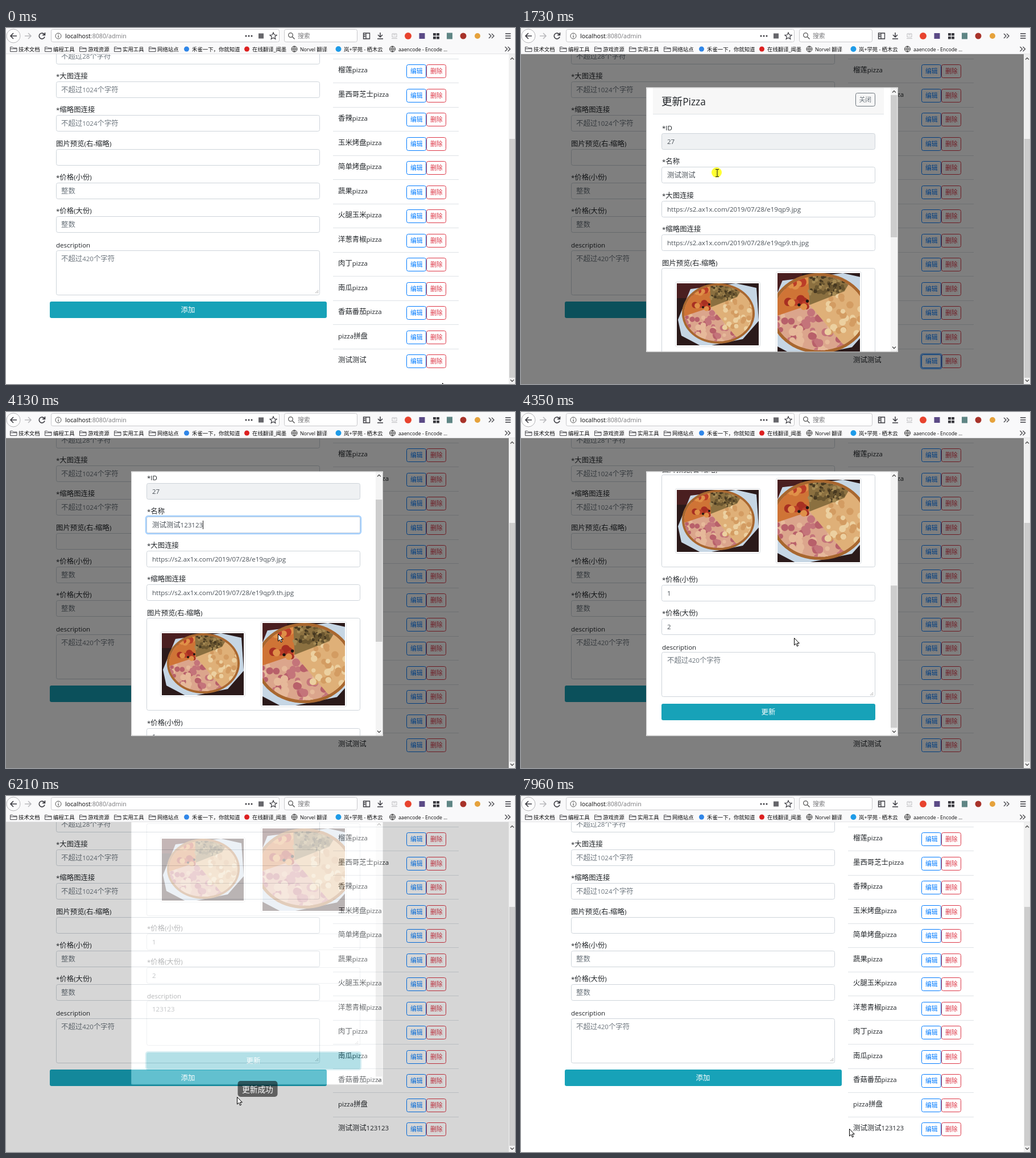
Animation, 895 px wide and 626 px high, one loop 8 s. Source, as an HTML page:

```html
<!DOCTYPE html>
<html lang="zh-CN">
<head>
<meta charset="utf-8">
<title>Pizza admin</title>
<style>
html, body { margin: 0; width: 100%; height: 100%; overflow: hidden; background: #fff; }
svg { display: block; }
text { font-family: "Open Sans", "Noto Sans CJK SC", "Noto Sans CJK", sans-serif; }
</style>
</head>
<body>
<svg id="stage" width="895" height="626" viewBox="0 0 895 626"></svg>
<script>
const INK = '#212529', GREY = '#6c757d', FIELD = '#495057', TEAL = '#17a2b8', BLUE = '#007bff', RED = '#dc3545';
const $ = id => document.getElementById(id);
const range = n => [...Array(n).keys()];

// Latin runs are set slightly smaller than the CJK around them
const mix = s => s.replace(/[ -~]+/g, m => `<tspan font-size=".93em">${m}</tspan>`);
const text = (x, y, s, fill = INK, size = 12.4, attrs = '') =>
  `<text x="${x}" y="${y}" fill="${fill}" font-size="${size}" ${attrs}>${mix(s)}</text>`;
const rect = (x, y, w, h, fill, attrs = '') =>
  `<rect x="${x}" y="${y}" width="${w}" height="${h}" fill="${fill}" ${attrs}/>`;
const path = (d, stroke, width = 1, attrs = '') =>
  `<path d="${d}" fill="none" stroke="${stroke}" stroke-width="${width}" ${attrs}/>`;
const dot = (x, y, r, fill, attrs = '') => `<circle cx="${x}" cy="${y}" r="${r}" fill="${fill}" ${attrs}/>`;
const box = (x, y, w, h, fill = '#fff', stroke = '#ced4da', attrs = '') =>
  rect(x + .5, Math.round(y) + .5, w - 1, h - 1, fill, `stroke="${stroke}" rx="3" ${attrs}`);
const ring = (id, x, y, w, h, color, alpha) =>
  rect(x - 1, y - 1, w + 2, h + 2, 'none', `id="${id}" rx="4" stroke="${color}" stroke-opacity="${alpha}" stroke-width="2.5"`);
const chevron = (x, y, dir) => path(`M${x - 3} ${y + 1.5 * dir}l3 ${-3 * dir} 3 ${3 * dir}`, '#505050', 1.4);
const grip = (x, y) => [[0, 0], [-2, 0], [-4, 0], [0, -2], [-2, -2], [0, -4]]
  .map(([a, b]) => rect(x + a, y + b, 1, 1, '#888')).join('');

function chrome() {
  const folder = x => path(`M${x} 33.5h4l1.5 1.5h6v6.5h-11.5zM${x} 36.5h11.5`, '#4a4a4f');
  const globe = x => dot(x, 37, 5, 'none', 'stroke="#333"') +
    path(`M${x - 5} 37h10M${x} 32v10M${x} 32q-5 5 0 10M${x} 32q5 5 0 10`, '#333', .8);
  const mark = (x, s) => text(x, 40.5, s, '#0c0c0d', 9.4);
  const more = (x, y) => path(`M${x} ${y - 4}l4 4-4 4m5-8l4 4-4 4`, '#4a4a4f', 1.4);
  const D = '#3a3a40';
  return rect(0, 0, 895, 46, '#f9f9fa') +
    path('M0 45.5H895', '#e3e3e5') +
    dot(13, 14, 12, '#fdfdfd', 'stroke="#b5b5b8"') +
    path('M19 14H8m5-5l-5 5 5 5', D, 1.6) + path('M33 14h11m-5-5l5 5-5 5', '#b9b9bc', 1.5) +
    path('M67.5 11.5a5 5 0 1 0 .5 4M68.5 8v4.5H64', D, 1.6) +
    box(79, 2, 402, 23, '#fff', '#c8c8cb') + box(489, 2, 129, 23, '#fff', '#c8c8cb') +
    dot(92, 14, 5, 'none', 'stroke="#555"') + path('M92 13v4M92 10.5v1.2', '#555', 1.2) +
    `<text x="104" y="17.5" font-size="10.7" fill="#0c0c0d">localhost<tspan fill="#77777a">:8080/admin</tspan></text>` +
    [422, 427, 432].map(x => dot(x, 14, 1.5, D)).join('') + rect(444, 9.5, 9, 9, '#66666b') +
    path('M470 8l1.8 4 4.2.4-3.2 2.9 1 4.2-3.8-2.2-3.8 2.2 1-4.2-3.2-2.9 4.2-.4z', D, 1.2) +
    dot(500.5, 12.5, 3.8, 'none', 'stroke="#555" stroke-width="1.3"') + path('M503.5 15.5l4 4', '#555', 1.4) +
    text(513, 17.5, '搜索', '#77777a', 10.8) +
    path('M628.5 9h11v10h-11zM633 9v10M629 12h3M629 15h3', D, 1.3) +
    path('M658 8v8m-4-4l4 4 4-4M653 19h10', D, 1.5) +
    path('M679 10h8v6h-8zM678 18.5h10M681 12h4', '#bdbdc0') +
    dot(707, 14, 6, '#e8432e') + rect(726.5, 9, 10, 10, '#5b4a86') +
    [[751, 9], [757, 9], [751, 15], [757, 15]].map(([x, y]) => rect(x, y, 5, 4.5, D)).join('') +
    rect(775, 8.5, 10, 11, '#5f8685') + dot(804, 14, 5.5, '#a8332a') + dot(829, 14, 5, '#e6a23c') +
    more(849, 14) + path('M878 10h9.5M878 14h9.5M878 18h9.5', D, 1.4) +
    ['技术文档', '编程工具', '游戏资源', '实用工具', '网络站点']
      .map((s, i) => folder(7.5 + 61 * i) + mark(22 + 61 * i, s)).join('') +
    dot(317.5, 37, 4.5, '#2f86e8') + mark(327, '禾雀一下，你就知道') +
    dot(423.5, 37, 4.5, '#dd2020') + mark(433, '在线翻译_闻墨') +
    globe(507) + mark(517, 'Norvel 翻译') +
    dot(584.5, 37, 5, '#1e9be8') + mark(594, '岚+学苑 - 栖木云') +
    globe(679.5) + mark(690, 'aaencode - Encode ...') + more(877.5, 37);
}

function page() {
  const fields = [['', '不超过28个字符'], ['*大图连接', '不超过1024个字符'], ['*缩略图连接', '不超过1024个字符'],
    ['图片预览(右-缩略)', ''], ['*价格(小份)', '整数'], ['*价格(大份)', '整数'], ['description', '不超过420个字符']];
  const dishes = ['榴莲', '墨西哥芝士', '香辣', '玉米烤盘', '简单烤盘', '蔬果', '火腿玉米', '洋葱青椒', '肉丁', '南瓜', '香菇番茄']
    .map(s => s + 'pizza').concat('pizza拼盘', '测试测试');
  const form = fields.map(([label, hint], i) => {
    const y = 34.5 + 59.35 * i;
    return text(88, y - 5, label) + box(88, y, 464, i == 6 ? 79 : 29) + text(97, y + 19, hint, GREY);
  }).join('');
  const list = dishes.map((s, i) => {
    const y = 64 + 42.52 * i, last = i == 12;
    return rect(575, Math.round(y - 10.5), 221, 1, '#dee2e6') +
      text(584, y + 14, s, INK, 12.4, last ? 'id="lastDish"' : '') +
      box(704, y, 35, 24, '#fff', BLUE, last ? 'id="edit"' : '') +
      text(711, y + 16, '编辑', BLUE, 10.85, last ? 'id="editText"' : '') +
      box(739, y, 35, 24, '#fff', RED) + text(746, y + 16, '删除', RED, 10.85);
  }).join('');
  return rect(0, 46, 884, 580, '#fff') + form + grip(548, 465) +
    rect(77, 481, 487, 29, TEAL, 'rx="3"') + text(320, 500, '添加', '#fff', 12.4, 'text-anchor="middle"') +
    list + ring('editRing', 704, 574, 35, 24, BLUE, .5);
}

// Flat pizza picture, 144 x 109
function pizza() {
  let seed = 7;
  const rnd = () => (seed = seed * 16807 % 2147483647) / 2147483647;
  const poly = (pts, fill) => `<polygon points="${pts}" fill="${fill}"/>`;
  const spread = (n, x, y, w, h, r, colors) => range(n).map(i =>
    dot((x + rnd() * w).toFixed(1), (y + rnd() * h).toFixed(1), r * (.6 + rnd() * .5), colors[i % colors.length])).join('');
  return `<symbol id="pizza" viewBox="0 0 144 109" preserveAspectRatio="xMidYMid slice">
    <clipPath id="disc"><ellipse cx="73" cy="53" rx="60" ry="49"/></clipPath>` +
    rect(0, 0, 144, 109, '#2b1a1a') + rect(0, 0, 50, 26, '#4a1f20') +
    poly('2,64 24,10 104,0 140,8 144,66 116,98 46,112 8,92', '#c6d6e4') +
    '<ellipse cx="73" cy="53" rx="64" ry="53" fill="#a8672f"/><g clip-path="url(#disc)">' +
    rect(0, 0, 144, 109, '#dba58c') + spread(75, 14, 52, 98, 56, 5, ['#c4747a', '#b8606a', '#e6b99a']) +
    poly('60,42 144,0 144,96 104,94', '#dfb078') + spread(38, 78, 30, 60, 52, 4.5, ['#ecd0a0', '#d39c62']) +
    poly('60,42 0,62 0,0 60,0', '#cf7436') + spread(18, 14, 8, 44, 38, 6, ['#a82f22', '#bb3d28', '#df9048']) +
    poly('60,42 58,0 120,0 106,24', '#8b7040') + spread(70, 60, 3, 46, 25, 2.6, ['#463820', '#6a5630', '#a58a54']) +
    dot(57, 37, 2, '#1d1512') + dot(46, 42, 2, '#1d1512') + '</g></symbol>';
}

function modal() {
  const row = (y, label, value, fill = '#fff', attrs = '') =>
    text(248, y - 5, label) + box(247, y, 376, 29, fill) + text(257, y + 19, value, FIELD, 12.4, attrs);
  const photo = (x, y, w, h) => box(x - 3, y - 3, w + 6, h + 6, '#fff', '#dee2e6') +
    `<use href="#pizza" x="${x}" y="${y}" width="${w}" height="${h}"/>`;
  const caret = (id, y) => rect(0, y, 1, 15, '#222', `id="${id}"`);
  const content = rect(232, 105, 406, 46, '#f7f7f7') + rect(232, 151, 406, 1, '#dee2e6') +
    text(247, 135.5, '更新Pizza', INK, 18.6) +
    box(588, 114, 35, 24, 'none', GREY) + text(594.5, 130, '关闭', GREY, 10.85) +
    row(185, '*ID', '27', '#eff1f3') +
    row(244.4, '*名称', '测试测试', '#fff', 'id="name"') + ring('nameRing', 247, 244, 376, 29, BLUE, .35) + caret('nameCaret', 251) +
    row(303.7, '*大图连接', 'https://s2.ax1x.com/2019/07/28/e19qp9.jpg') +
    row(363, '*缩略图连接', 'https://s2.ax1x.com/2019/07/28/e19qp9.th.jpg') +
    text(248, 418, '图片预览(右-缩略)') + box(247, 422, 376, 163) +
    photo(274, 449, 144, 109) + photo(451, 431, 145, 145) +
    row(616, '*价格(小份)', '1') + row(675, '*价格(大份)', '2') +
    text(248, 730, 'description') + box(247, 734, 376, 79) + grip(618, 809) +
    ring('descRing', 247, 734, 376, 79, BLUE, .35) +
    text(257, 753, '', FIELD, 12.4, 'id="desc"') + caret('descCaret', 741) +
    rect(247, 825, 376, 29, TEAL, 'rx="3" id="update"') + ring('updateRing', 247, 825, 376, 29, TEAL, .5) +
    text(435, 844, '更新', '#fff', 12.4, 'text-anchor="middle"');
  return rect(220, 104.5, 443, 465, '#fff', 'rx="3"') +
    `<svg x="220" y="105" width="430" height="464" viewBox="220 105 430 464"><g id="scroll">${content}</g></svg>` +
    rect(650, 105, 12, 464, '#f4f4f4') + rect(650, 118, 11.5, 250, '#cdcdcd', 'id="thumb"') +
    chevron(656, 112, 1) + chevron(656, 562, -1) +
    rect(220.5, 105, 442, 464, 'none', 'rx="3" stroke="#000" stroke-opacity=".2"');
}

$('stage').innerHTML = pizza() +
  `<svg x="0" y="46" width="884" height="580" viewBox="0 46 884 580">${page()}
    <path id="shade" fill-rule="evenodd"/><g id="modal">${modal()}</g></svg>` +
  rect(884, 46, 11, 580, '#f0f0f0') + rect(885, 195, 10, 420, '#cdcdcd') + chevron(890, 54, 1) + chevron(890, 620, -1) +
  chrome() +
  `<g id="toast">${rect(407.5, 501, 70, 28, '#000', 'rx="5" fill-opacity=".55"')}${text(415, 520.5, '更新成功', '#fff', 13.7)}</g>
  <g id="cursor">${dot(-1, -1, 9, '#ff0', 'id="press" fill-opacity=".8"')}
    <path id="arrow" d="M.5.5V13L3.5 10.3 5.5 15 7.5 14 5.6 9.6H9.3Z" fill="#fff" stroke="#000"/>
    <path id="beam" d="M-3 -6.5H-1Q0 -6.5 0 -5.5Q0 -6.5 1 -6.5H3M0 -5.5V5.5M-3 6.5H-1Q0 6.5 0 5.5Q0 6.5 1 6.5H3" fill="none" stroke="#111"/></g>`;

// Bursts of screen updates: first, last, count
const bursts = [[100, 540, 5], [760, 1400, 7], [1540, 2270, 8], [2380, 2500, 2], [2830, 3030, 3], [3250, 4020, 8],
  [4130, 4900, 8], [5000, 5780, 8], [5890, 6660, 8], [6760, 7090, 4], [7310, 7960, 7]];
function snap(t) {
  let shown = 0;
  for (const [a, b, n] of bursts) {
    const step = (b - a) / (n - 1);
    if (t >= a) shown = a + step * Math.min(n - 1, Math.floor((t - a) / step + .2));
  }
  return shown;
}

// Linear interpolation through [time, ...values] rows
function at(t, keys) {
  const i = keys.findIndex(k => k[0] > t);
  if (i < 1) return keys.at(i).slice(1);
  const a = keys[i - 1], b = keys[i], u = (t - a[0]) / (b[0] - a[0]);
  return a.slice(1).map((v, j) => v + (b[j + 1] - v) * u);
}

const pointer = [[0, 767, 624], [100, 765, 622], [540, 715, 587], [870, 715, 587], [1400, 430, 185], [1640, 345, 250],
  [1748, 345, 255], [2270, 345, 255], [2380, 338, 252], [3250, 342, 229], [3470, 342, 229], [4020, 470, 360],
  [4130, 478, 390], [4240, 480, 397], [4460, 480, 397], [4790, 380, 440], [4900, 380, 440], [5440, 385, 450],
  [5780, 406, 529], [6220, 406, 529], [6660, 440, 580], [7090, 573, 609], [7310, 598, 600], [7640, 577, 585]];
const fade = [[0, 0], [700, 0], [760, .15], [867, .82], [970, 1], [6110, 1], [6220, .32], [6330, 0]];
const slide = [[0, -80], [760, -80], [867, -21], [970, 0], [6110, 0], [6220, -62], [6330, -116]];
const scrolling = [[0, 0], [4020, 0], [4130, 60], [4240, 270], [4350, 312]];
const toastKeys = [[0, 0, 0], [6000, 0, 0], [6110, 1, 0], [7310, 1, 0], [7640, 0, -15]];
const nameTimes = [2830, 2930, 3030, 3240, 3250, 3350];
const descTimes = [5000, 5100, 5110, 5220, 5330, 5340];

const set = (id, attrs) => Object.entries(attrs).forEach(([k, v]) => $(id).setAttribute(k, v));
const show = (id, on) => set(id, { visibility: on ? 'visible' : 'hidden' });
const typed = (t, times) => '123123'.slice(0, times.filter(k => k <= t).length);
const placeCaret = (id, field, on) => {
  show(id, on);
  if (on) set(id, { x: Math.round(257 + (field.textContent ? field.getComputedTextLength() : 0)) });
};

function draw(time) {
  const t = snap(time), during = (a, b) => t >= a && t < b;
  const [x, y] = at(t, pointer), [p] = at(t, fade), [dy] = at(t, slide), [sy] = at(t, scrolling);

  const top = 104.5 + dy;
  set('modal', { opacity: p, transform: `translate(0 ${dy})`, display: p ? 'inline' : 'none' });
  set('shade', { d: `M0 46H884V626H0Z M220 ${top}h443v465h-443Z`, 'fill-opacity': p / 2 });
  set('scroll', { transform: `translate(0 ${-sy})` });
  set('thumb', { y: 118 + sy * .6 });

  const hover = t < 750 && x > 704 && x < 739 && y > 574 && y < 598;
  set('edit', { fill: hover ? BLUE : '#fff' });
  set('editText', { fill: hover ? '#fff' : BLUE });
  show('editRing', during(750, 1800));
  $('lastDish').innerHTML = mix('测试测试' + (t >= 6100 ? '123123' : ''));

  const inName = during(1800, 4780), inDesc = during(4780, 5880), note = typed(t, descTimes);
  $('name').innerHTML = mix('测试测试' + typed(t, nameTimes));
  $('desc').innerHTML = mix(note || '不超过420个字符');
  set('desc', { fill: note ? FIELD : GREY });
  show('nameRing', inName);
  show('descRing', inDesc);
  placeCaret('nameCaret', $('name'), inName);
  placeCaret('descCaret', note ? $('desc') : { textContent: '' }, inDesc);
  show('updateRing', t >= 5880);
  set('update', { fill: during(5600, 6100) && y > 513 ? '#138496' : TEAL });

  const [alpha, lift] = at(t, toastKeys);
  set('toast', { opacity: alpha, transform: `translate(0 ${lift})` });

  const beam = during(1600, 2450) || during(4700, 4990);
  const hidden = during(2450, 3240) || during(4990, 5440);
  set('cursor', { transform: `translate(${Math.round(x)} ${Math.round(y)})` });
  show('beam', beam);
  show('arrow', !beam && !hidden);
  show('press', during(1740, 1850) || during(4780, 4890));
}

const start = performance.now();
function tick() {
  draw((performance.now() - start) % 8000);
  requestAnimationFrame(tick);
}
tick();
</script>
</body>
</html>
```
